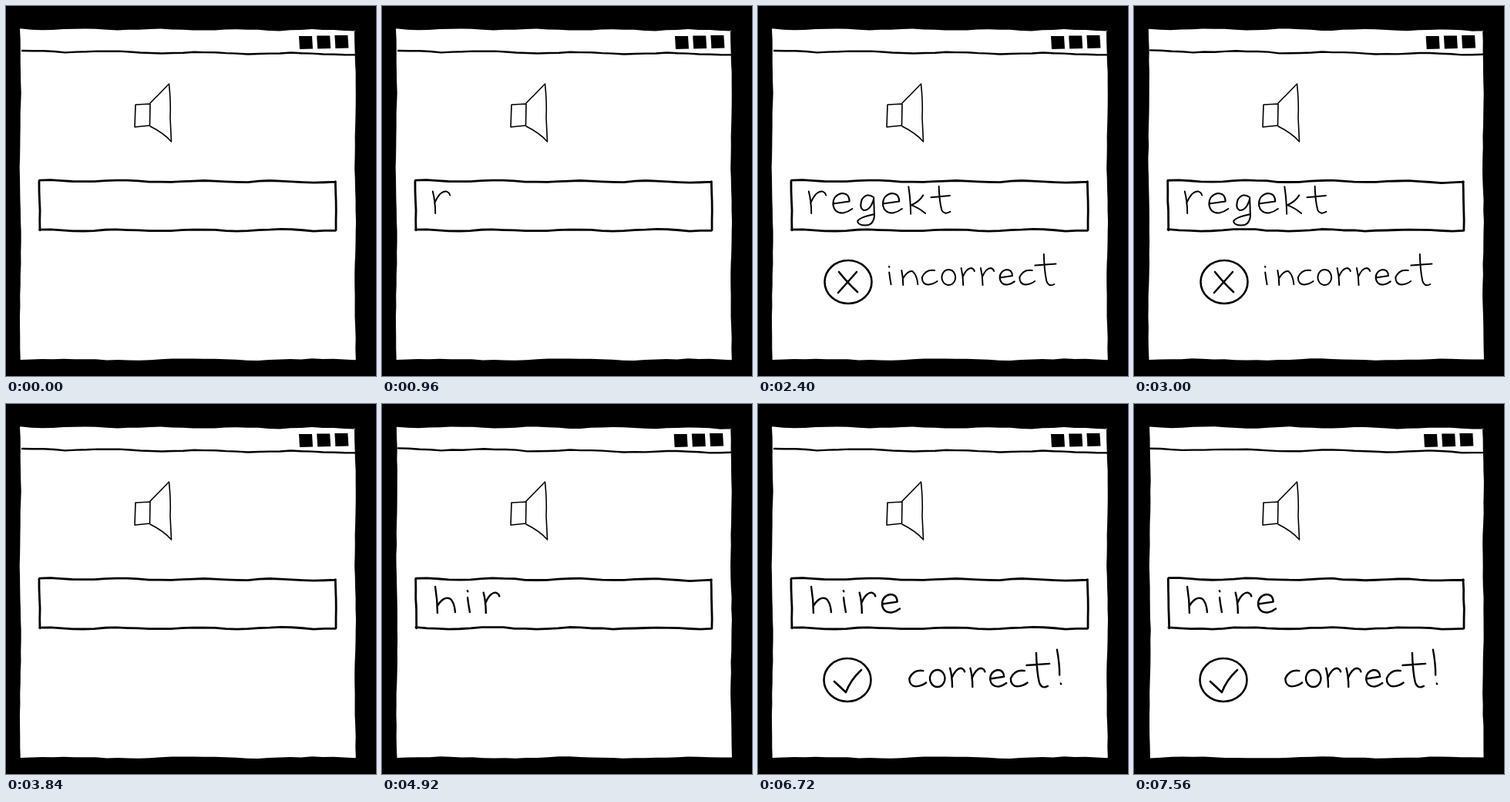
These frames come from a looping animation (480 px wide and 480 px high, 7680 ms). An HTML page with a canvas:

```html
<!DOCTYPE html>
<html lang="en">
<head>
<meta charset="utf-8">
<title>Spelling quiz</title>
<style>
  html, body { margin: 0; width: 100%; height: 100%; overflow: hidden; background: #000; }
  canvas { display: block; width: 100vw; height: 100vh; object-fit: contain; }
</style>
</head>
<body>
<canvas id="stage" width="480" height="480"></canvas>
<script>
const ctx = document.getElementById('stage').getContext('2d');
const LOOP = 7680;
const BOIL = 120;
const POSES = 4;
const STEP = 160;

// Handwriting: baseline at y 0, x-height 10, centred on x 0. T is a tall t.
const glyphs = {
  r: 'M-4.3-11Q-3-6-3 0M-3.4-5Q-1-11 2.3-11Q4-10.5 4.3-9',
  e: 'M-4.6-4.8L3.6-6Q3.5-10-.3-10Q-4.6-9-4.6-4.5Q-4 0 .5-.2Q3-.7 5-2.3',
  g: 'M3.3-8Q0-10.5-2.6-7Q-4.2-2.5-1.5-1.5Q2-1.8 3.3-7.5L3.6 1.5Q3 6-.8 6Q-4.5 6-4.8 4Q-4 2 3.4 .5',
  k: 'M-4.2-13.3Q-3.2-7-3.1 .3M3.1-9Q.8-5.5-2.8-4.2Q1-2.7 4.2 0',
  t: 'M-1.5-13.5Q-1.2-5.5 0-1.5Q1.2 .8 4.2-.8M-5.4-8L4-8.8',
  T: 'M-1.3-20Q-1-9 .5-2.5Q2 1.5 5.5-.5M-7-12.7L6.5-13.7',
  h: 'M-5.4-14.2Q-4.2-7-4.2 0M-4.2-3.8Q-.8-9.5 2.9-7.5Q5-5.5 5.4-.4',
  i: 'M-.5-12L-.3-11.6M-.4-8.3Q0-4.6 .8-.4',
  n: 'M-5-9.5Q-4-5-4 0M-4-4.5Q-1-9.5 2-9Q5-6.5 5.5-.5',
  c: 'M3.8-9.5Q-2-10.5-4.4-5Q-4.4-.5-.5-.3Q3-.5 5.5-2.5',
  o: 'M0-10A4.4 5 0 1 0 .4-10',
  '!': 'M-1-22Q.5-14 .5-7M1.2-2L1.4-1.7'
};

function write(text, x, baseline, pitch, xHeight) {
  const size = xHeight / 10;
  return [...text].map((letter, i) => {
    const path = new Path2D();
    path.addPath(new Path2D(glyphs[letter]),
      new DOMMatrix([size, 0, 0, size, x + i * pitch, baseline]));
    return path;
  });
}

function badge(x, mark) {
  const ring = new Path2D();
  ring.ellipse(x, 358, 30.5, 28, 0, 0, Math.PI * 2);
  return [ring, new Path2D(mark)];
}

const speaker = [
  new Path2D('M168 128L187 127L186.5 155L167 157Z'),
  new Path2D('M187 126Q200 113 211.5 101Q214 125 213 145L214.5 176Q205 165 187 156')
];
const waves = [1, 2, 3].map(i => {
  const arc = new Path2D();
  arc.arc(190, 139, 24 + 20 * i, -0.5, 0.5);
  return arc;
});

const rounds = [
  { sound: 160, quiet: 800, typing: 960, verdict: 2400, ink: 2,
    word: write('regekt', 77, 269, 32.3, 26),
    label: write('incorrecT', 171, 362, 25.3, 20),
    badge: badge(117, 'M105 345Q117 360 129 371M128 345L104 372') },
  { sound: 4000, quiet: 4520, typing: 4560, verdict: 5600, ink: 2.4,
    word: write('hire', 82, 271, 30, 24),
    label: write('correcT!', 206, 367, 26.3, 22),
    badge: badge(116, 'M99 360L114 374Q120 358 134 345') }
];

const random = (n, seed) => {
  const v = Math.sin(n * 12.9898 + seed * 78.233) * 43758.5453;
  return v - Math.floor(v);
};

// A hand-drawn line: a slow wave along its length plus seeded roughness.
function roughLine(x0, y0, x1, y1, crest, period, seed) {
  const vertical = Math.abs(y1 - y0) > Math.abs(x1 - x0);
  const count = Math.round(Math.hypot(x1 - x0, y1 - y0) / 14);
  return Array.from({ length: count + 1 }, (_, i) => {
    const x = x0 + (x1 - x0) * i / count;
    const y = y0 + (y1 - y0) * i / count;
    const along = vertical ? y : x;
    const shift = -Math.cos((along - crest) / period * Math.PI * 2) + random(i, seed) - 0.5;
    return vertical ? [x + shift * 0.7, y] : [x, y + shift];
  });
}

function roughBox(left, top, right, bottom, topCrest, bottomCrest, bottomPeriod, seed) {
  return [
    ...roughLine(left, top, right, top + 1.5, topCrest, 100, seed),
    ...roughLine(right, top + 1, right, bottom, 200, 170, seed + 1),
    ...roughLine(left, bottom, right, bottom, bottomCrest, bottomPeriod, seed + 2).reverse(),
    ...roughLine(left, top, left, bottom, 205, 200, seed + 3).reverse()
  ];
}

function trace(points) {
  ctx.beginPath();
  points.forEach(([x, y]) => ctx.lineTo(x, y));
}

function drawWindow(pose) {
  const seed = pose * 20 + 1;
  ctx.fillStyle = '#fff';
  trace(roughBox(18.7 + pose * 0.7, 30, 453, 458.6, 200, 240, 165, seed));
  ctx.fill();

  ctx.lineWidth = 2.4;
  trace(roughLine(21, 58.5, 453, 62.5, 140, 120, seed + 5));
  ctx.stroke();

  ctx.fillStyle = '#000';
  for (let i = 0; i < 3; i++) {
    const x = 380 - pose * 4 / 3 + i * 23.2;
    const y = 39 - i * 0.5;
    trace([[x, y], [x + 17, y], [x + 18, y + 16.5], [x + 1, y + 17]]);
    ctx.fill();
  }

  ctx.lineWidth = 2.8;
  trace(roughBox(43.5 + pose * 0.5, 226.7, 427.5, 290.8, 150, 355, 105, seed + 8));
  ctx.closePath();
  ctx.stroke();
}

function stroke(paths, width, count = paths.length) {
  ctx.lineWidth = width;
  paths.slice(0, count).forEach(path => ctx.stroke(path));
}

const shown = (from, t) => Math.max(0, Math.floor((t - from) / STEP) + 1);

function draw(t) {
  const round = rounds[t < LOOP / 2 ? 0 : 1];
  ctx.fillStyle = '#000';
  ctx.fillRect(0, 0, 480, 480);
  ctx.strokeStyle = '#000';
  ctx.lineCap = ctx.lineJoin = 'round';

  drawWindow(Math.floor(t / BOIL) % POSES);
  stroke(speaker, 1.6);
  if (t < round.quiet) stroke(waves, 1.6, shown(round.sound, t));
  stroke(round.word, round.ink, shown(round.typing, t));
  if (t >= round.verdict) {
    stroke(round.badge, 2.6);
    stroke(round.label, round.ink);
  }
}

const start = performance.now();
function animate() {
  draw((performance.now() - start) % LOOP);
  requestAnimationFrame(animate);
}
animate();
</script>
</body>
</html>
```
